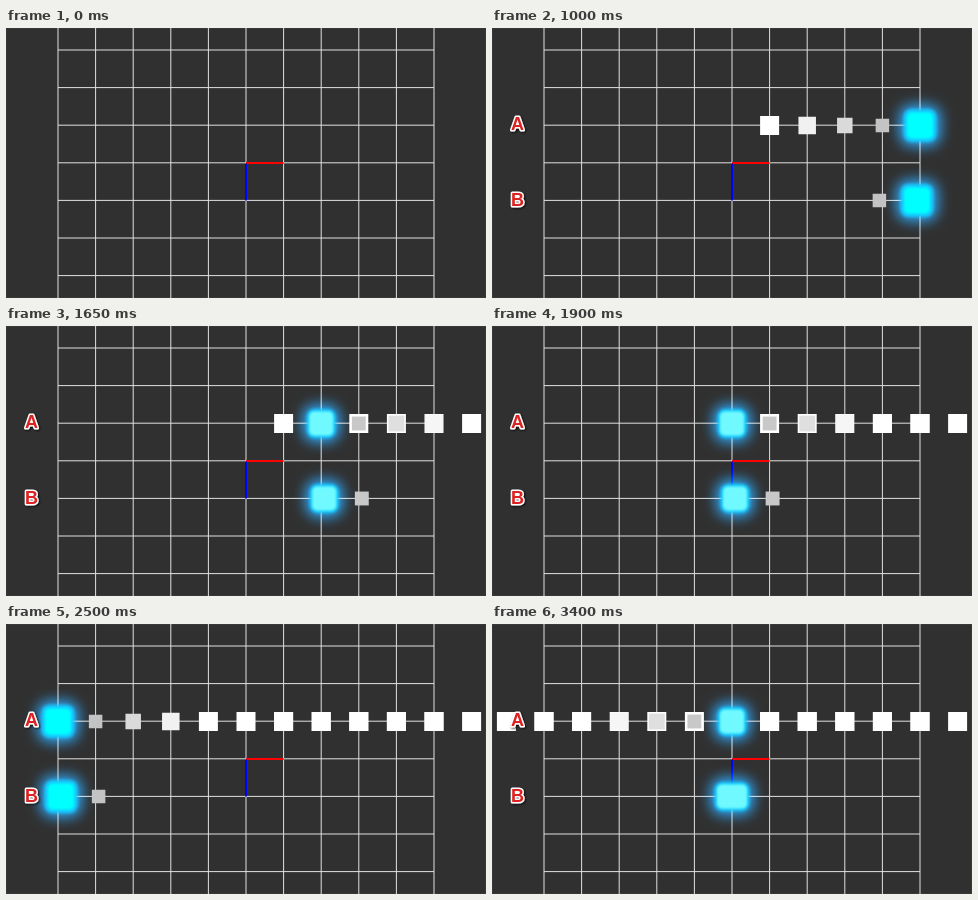
Recreate the animation shown at these times as an HTML page. Size 480 by 270 pixels, loop 3.45 s.

```html
<!DOCTYPE html>
<html lang="en">
<head>
<meta charset="utf-8">
<title>Trail comparison</title>
<style>
  html, body { margin: 0; width: 100%; height: 100%; overflow: hidden; background: #303030; }
  svg { display: block; width: 100vw; height: 100vh; }
  text {
    font: bold 18px "Liberation Sans", Arial, sans-serif;
    text-anchor: middle;
    fill: #dc2020;
    stroke: #fff;
    stroke-width: 3px;
    stroke-linejoin: round;
    paint-order: stroke;
  }
  .halo { mix-blend-mode: screen; }
</style>
</head>
<body>
<svg id="stage" viewBox="0 0 480 270">
  <defs>
    <filter id="wide" x="-100%" y="-100%" width="300%" height="300%" color-interpolation-filters="sRGB"><feGaussianBlur stdDeviation="6.5"/></filter>
    <filter id="near" x="-60%" y="-60%" width="220%" height="220%" color-interpolation-filters="sRGB"><feGaussianBlur stdDeviation="1.8"/></filter>
    <filter id="soft" x="-60%" y="-60%" width="220%" height="220%" color-interpolation-filters="sRGB"><feGaussianBlur stdDeviation="1.2"/></filter>
    <filter id="shade" x="-50%" y="-50%" width="200%" height="200%">
      <feDropShadow dx="1" dy="1" stdDeviation="1" flood-color="#000" flood-opacity=".8"/>
    </filter>
  </defs>
  <rect x=".5" y=".5" width="479" height="269" fill="#303030" stroke="#383838"/>
  <path id="grid" stroke="#e0e0e0" fill="none"/>
  <path d="M240 134.9H277.6" stroke="#f00" stroke-width="2"/>
  <path d="M240 135.5V172.5" stroke="#00f" stroke-width="2"/>
  <g id="trail"></g>
  <g id="glows"></g>
  <g id="labels" filter="url(#shade)">
    <text x="25.5" y="102">A</text>
    <text x="25.5" y="178.3">B</text>
  </g>
</svg>
<script>
const LOOP = 3450, START = 500, FRAME = 50;
const CELL = 37.6, CX = 240, CY = 134.8, ROW_A = 97.5, ROW_B = 172.5, LAG = 3, STEPS = 24;
const $ = id => document.getElementById(id);

function set(el, attrs) {
  for (const name in attrs) el.setAttribute(name, attrs[name]);
}

function add(parent, tag, attrs = {}) {
  const el = document.createElementNS("http://www.w3.org/2000/svg", tag);
  set(el, attrs);
  return parent.appendChild(el);
}

function box(el, x, y, size, extra = 0) {
  const width = size + extra;
  set(el, { x: x - width / 2, y: y - size / 2, width, height: size });
}

const show = (el, on) => { el.style.display = on ? "" : "none"; };
const mix = (a, b, p) => a + (b - a) * p;

let grid = "";
for (let i = -5; i <= 5; i++) grid += `M${CX + i * CELL} 0V270`;
for (let i = -3; i <= 3; i++) grid += `M${CX - 5 * CELL} ${CY + i * CELL}h${10 * CELL}`;
$("grid").setAttribute("d", grid);

const squares = Array.from({ length: STEPS }, () => add($("trail"), "rect"));
const tail = add($("trail"), "rect");

function makeGlow() {
  const g = add($("glows"), "g");
  const layer = (name, fill, filter, rx) =>
    add(g, "rect", { class: name, fill, filter: `url(#${filter})`, rx });
  return {
    g,
    halo: layer("halo", "#0090f0", "wide", 13),
    rim: layer("rim", "#14ccff", "near", 8),
    core: layer("core", "#0ff", "soft", 5)
  };
}
const glowA = makeGlow(), glowB = makeGlow();

// Out to the right, back across to the left, then home
function column(k) {
  return k <= 6 ? k : k <= 18 ? 12 - k : k - 24;
}
const xA = k => CX + column(k) * CELL;
const xB = k => xA(k) + (k > 6 && k <= 18 ? LAG : -LAG);

function drawSquare(el, x, y, age) {
  const v = Math.min(255, Math.round(172 + 23 * age));
  box(el, x, y, Math.min(19, 11.5 + 2 * age));
  el.setAttribute("fill", `rgb(${v},${v},${v})`);
}

function drawGlow(glow, x, y, phase, extra = 0) {
  const p = Math.min(1, phase / 0.2);
  const fade = Math.max(0, (phase - 0.2) / 0.7);
  const shrink = 8 * fade;
  box(glow.halo, x, y, mix(42, 38, p) - shrink, extra);
  box(glow.rim, x, y, mix(33, 29, p) - shrink, extra);
  box(glow.core, x, y, mix(26, 24, p) - shrink, extra);
  const red = Math.round(mix(mix(0, 112, p), 200, fade));
  glow.core.setAttribute("fill", `rgb(${red},${Math.round(mix(255, 250, p))},255)`);
  glow.g.setAttribute("opacity", 1 - fade);
}

function render(t) {
  const on = t >= START;
  for (const id of ["trail", "glows", "labels"]) show($(id), on);
  if (!on) return;

  // Two steps pass in every five ticks
  const ticks = 2 * Math.floor((t - START) / FRAME);
  const now = 1 + Math.floor(ticks / 5);
  const phase = (ticks % 5) / 5;
  const home = now === STEPS;

  squares.forEach((el, i) => {
    const k = i + 1;
    show(el, k <= now);
    if (k <= now) drawSquare(el, xA(k), ROW_A, now - k + phase);
  });

  const hasTail = now > 1 && !home;
  show(tail, hasTail);
  if (hasTail) drawSquare(tail, xB(now - 1), ROW_B, 1 + phase);

  drawGlow(glowA, xA(now), ROW_A, phase);
  // Back home, both directions of travel merge into one wide glow
  drawGlow(glowB, home ? CX : xB(now), ROW_B, phase, home ? 2 * LAG : 0);
}

const origin = performance.now();
function tick() {
  render((performance.now() - origin) % LOOP);
  requestAnimationFrame(tick);
}
tick();
</script>
</body>
</html>
```
